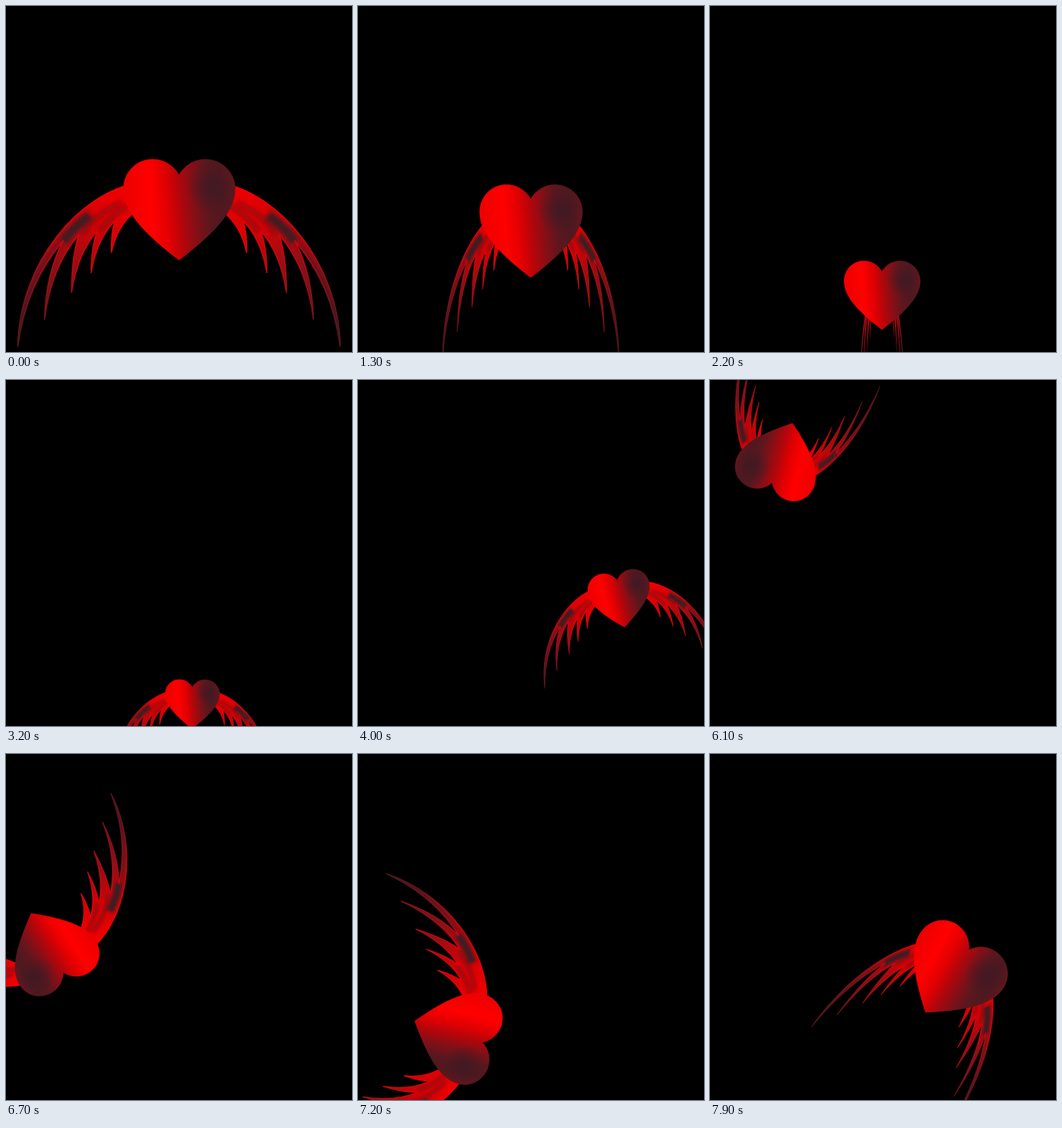
Animation, 512 px wide and 512 px high, one loop 8 s. Source, as an HTML page:

```html
<!DOCTYPE html>
<html lang="en">
<head>
<meta charset="utf-8">
<title>Winged heart</title>
<style>
  html, body { margin: 0; width: 100%; height: 100%; overflow: hidden; background: #000; }
  svg { display: block; width: 100vw; height: 100vh; }
</style>
</head>
<body>
<svg viewBox="0 0 512 512">
  <defs>
    <linearGradient id="body" gradientUnits="userSpaceOnUse" x1="175" y1="284" x2="338" y2="270">
      <stop offset="0" stop-color="#ec0000"/>
      <stop offset=".24" stop-color="#ff0000"/>
      <stop offset=".38" stop-color="#e00002"/>
      <stop offset=".5" stop-color="#b2060b"/>
      <stop offset=".63" stop-color="#821017"/>
      <stop offset=".76" stop-color="#5a171e"/>
      <stop offset=".88" stop-color="#50181f"/>
      <stop offset="1" stop-color="#64161d"/>
    </linearGradient>
    <radialGradient id="shade" gradientUnits="userSpaceOnUse" cx="305" cy="268" r="38">
      <stop offset="0" stop-color="#3c1a24" stop-opacity=".85"/>
      <stop offset="1" stop-color="#3c1a24" stop-opacity="0"/>
    </radialGradient>
    <linearGradient id="plume" gradientUnits="userSpaceOnUse" x1="180" y1="272" x2="60" y2="490">
      <stop offset="0" stop-color="#f00000"/>
      <stop offset=".3" stop-color="#d00206"/>
      <stop offset=".6" stop-color="#8c1018"/>
      <stop offset="1" stop-color="#481a22"/>
    </linearGradient>
    <linearGradient id="rim" gradientUnits="userSpaceOnUse" x1="180" y1="272" x2="50" y2="490">
      <stop offset="0" stop-color="#ff0000"/>
      <stop offset=".55" stop-color="#b80a10"/>
      <stop offset="1" stop-color="#5a161d"/>
    </linearGradient>
    <filter id="soft" x="-30%" y="-30%" width="160%" height="160%"><feGaussianBlur stdDeviation="3"/></filter>
    <path id="heartShape" d="M256 250C247 235 233 227 217 227C193 227 174 246 174 271C174 304 204 336 256 376C308 336 339 304 339 271C339 246 319 227 295 227C279 227 265 235 256 250Z"/>
    <path id="wingShape" d="M196 262C110 275 19 380 17.500 504Q30 411 85 347Q59 395 57 464Q67 386 108 338Q97 370 97 424Q106 366 135 333Q126 357 126 395Q134 346 161 318Q155 338 156 365Q164 325 192 303Z"/>
    <clipPath id="wingClip"><use href="#wingShape"/></clipPath>
    <g id="wing">
      <use href="#wingShape" fill="url(#plume)"/>
      <g clip-path="url(#wingClip)" fill="none" stroke="#3c1a24" filter="url(#soft)">
        <path d="M84 349Q98 329 124 309" stroke-width="14"/>
        <path d="M80 352Q40 405 22 480" stroke-width="6" opacity=".6"/>
        <path d="M113 337Q135 306 170 291M139 333Q156 308 184 294" stroke-width="5" opacity=".55"/>
      </g>
      <use href="#wingShape" fill="none" stroke="url(#rim)" stroke-width="1.800"/>
    </g>
  </defs>
  <rect width="512" height="512"/>
  <g id="flyer">
    <g id="wings">
      <use href="#wing"/>
      <use href="#wing" transform="translate(512) scale(-1 1)"/>
    </g>
    <use href="#heartShape" fill="url(#body)" stroke="url(#body)"/>
    <use href="#heartShape" fill="url(#shade)"/>
  </g>
</svg>
<script>
  const LOOP = 8000, STEP = 100, HOLD = 1000, TURN = 20;
  const PIVOT = [256, 313];
  const FLAP = [1, 1, 1, .594, .2, .594, .985, 1];

  // step, x, y, angle
  const FLIGHT = [
    [20, 253, 518, 0],
    [26, 323, 417, 0],
    [30, 389, 331, -9],
    [36, 425, 200, -42],
    [41, 380, 92, -72.4],
    [46, 248, 58, -117],
    [51, 107, 108, -161],
    [54, 70, 191, -183],
    [58, 66, 308, -217],
    [62, 134, 411, -252.4],
    [65, 228, 435, -285],
    [67, 298, 404, -305],
    [69, 351, 336, -325.2]
  ];

  const flyer = document.getElementById('flyer');
  const wings = document.getElementById('wings');

  function slope(i, c) {
    const a = FLIGHT[Math.max(i - 1, 0)];
    const b = FLIGHT[Math.min(i + 1, FLIGHT.length - 1)];
    return (b[c] - a[c]) / (b[0] - a[0]);
  }

  // Smooth curve through the flight table
  function along(step, c) {
    let i = 0;
    while (i < FLIGHT.length - 2 && step > FLIGHT[i + 1][0]) i++;
    const a = FLIGHT[i], b = FLIGHT[i + 1], span = b[0] - a[0];
    const u = (step - a[0]) / span, v = 1 - u;
    return v * v * (1 + 2 * u) * a[c] + u * u * (1 + 2 * v) * b[c]
      + span * u * v * (v * slope(i, c) - u * slope(i + 1, c));
  }

  function pose(step) {
    if (step < TURN) {
      return { x: 256 - .13 * step, y: 313 + 10.25 * step, angle: 0, scale: 1 - .0265 * step };
    }
    return {
      x: along(step, 1), y: along(step, 2), angle: along(step, 3),
      scale: .47 + .0086 * (step - TURN)
    };
  }

  function draw(time) {
    const step = Math.max(0, Math.floor((time - HOLD) / STEP));
    const { x, y, angle, scale } = pose(step);
    flyer.setAttribute('transform',
      `translate(${x} ${y}) rotate(${angle}) scale(${scale}) translate(${-PIVOT[0]} ${-PIVOT[1]})`);
    wings.setAttribute('transform',
      `translate(${PIVOT[0]}) scale(${FLAP[step % FLAP.length]} 1) translate(${-PIVOT[0]})`);
  }

  const start = performance.now();
  function tick() {
    draw((performance.now() - start) % LOOP);
    requestAnimationFrame(tick);
  }
  tick();
</script>
</body>
</html>
```
